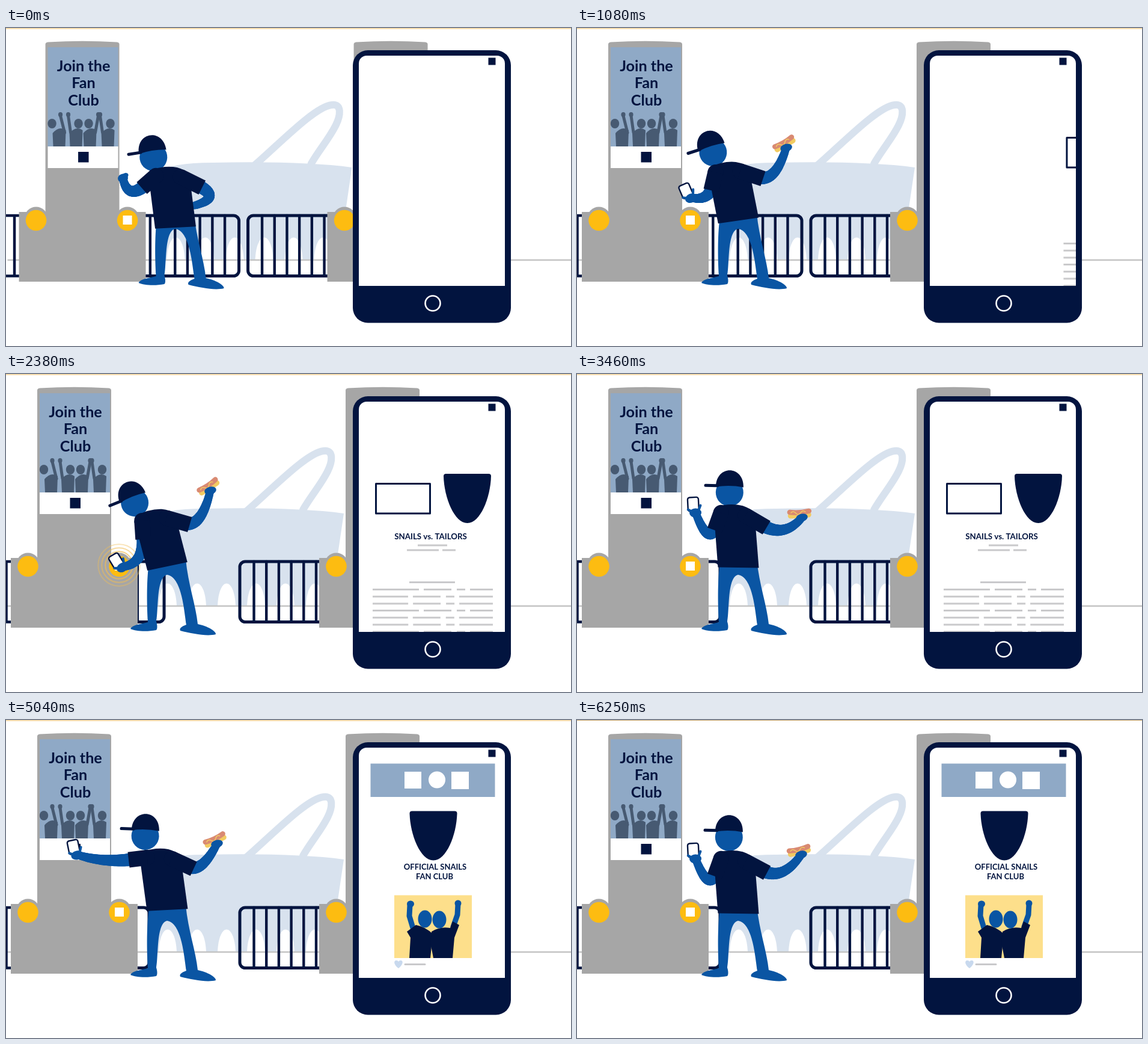
An HTML page with a canvas for the animation above (6290 ms loop, 940 by 529 pixels).

```html
<!DOCTYPE html>
<html lang="en">
<head>
<meta charset="utf-8">
<title>Fan club gate</title>
<style>
html, body { margin: 0; width: 100%; height: 100%; overflow: hidden; background: #fff; }
canvas { display: block; }
</style>
</head>
<body>
<canvas id="stage" width="940" height="529"></canvas>
<script>
const g = document.getElementById('stage').getContext('2d');
const LOOP = 6290;
const NAVY = '#02143f', SKIN = '#0a55a3', GRAY = '#a6a6a6', STEEL = '#8fa9c6',
  PALE = '#d8e2ee', GOLD = '#fdbc11', CROWD = '#475a72', RULE = '#c9c9cb';

const clamp = v => Math.min(1, Math.max(0, v));
const span = (t, a, b) => clamp((t - a) / (b - a));
const ease = p => p * p * (3 - 2 * p);
const mix = (a, b, p) => a + (b - a) * p;

function rect(x, y, w, h, color) { g.fillStyle = color; g.fillRect(x, y, w, h); }
function oval(x, y, rx, ry, color, turn = 0) {
  g.fillStyle = color;
  g.beginPath();
  g.ellipse(x, y, rx, ry, turn, 0, 7);
  g.fill();
}
function circle(x, y, r, color, width) {
  g.strokeStyle = color;
  g.lineWidth = width;
  g.beginPath();
  g.arc(x, y, r, 0, 7);
  g.stroke();
}
function shape(d, color) { g.fillStyle = color; g.fill(new Path2D(d)); }
function line(d, width, color) {
  g.strokeStyle = color;
  g.lineWidth = width;
  g.stroke(new Path2D(d));
}
function box(x, y, w, h, r, color, width) {
  g.beginPath();
  g.roundRect(x, y, w, h, r);
  if (width) { g.strokeStyle = color; g.lineWidth = width; g.stroke(); }
  else { g.fillStyle = color; g.fill(); }
}
function label(text, x, y, size) {
  g.font = `bold ${size}px Lato, sans-serif`;
  g.textAlign = 'center';
  g.fillStyle = NAVY;
  g.fillText(text, x, y);
}
function at(x, y, degrees, draw) {
  g.save();
  g.translate(x, y);
  g.rotate(degrees * Math.PI / 180);
  draw();
  g.restore();
}

// head: x, y, tilt; body: neck x, y, hip y, lean; arms: elbow x, y, hand x, y
const start = { head: [230, 204, -9], body: [251, 231, 332, -3], left: [189, 287, 181, 250], right: [346, 282, 301, 295] };
const wave = { head: [250, 185, -7], body: [257, 216, 321, 1], left: [189, 222, 180, 187], right: [342, 261, 368, 212] };
const tap = { head: [212, 201, -22], body: [239, 227, 320, -12], left: [231, 316, 193, 321], right: [325, 256, 340, 194] };
const tapLow = { ...tap, head: [210, 204, -22] };
const stand = { head: [254, 186, 1], body: [256, 217, 322, 1], left: [219, 288, 197, 230], right: [345, 273, 374, 239] };
const reach = { head: [232, 182, 2], body: [250, 214, 316, -3], left: [161, 238, 118, 224], right: [326, 254, 351, 206] };
const rest = { ...stand, head: [253, 184, 1], right: [342, 268, 373, 224] };
const keys = [[0, start], [630, wave], [1330, tap], [1580, tap], [2380, tapLow], [2550, tapLow],
  [3150, stand], [3950, stand], [4550, reach], [5200, reach], [5850, rest], [LOOP, rest]];

function poseAt(t) {
  const i = Math.max(1, keys.findIndex(k => k[0] > t));
  const [t0, a] = keys[i - 1], [t1, b] = keys[i], p = ease(span(t, t0, t1));
  const pose = {};
  for (const part in a) pose[part] = a[part].map((v, n) => mix(v, b[part][n], p));
  return pose;
}

function stadium() {
  line('M398 230C440 194 500 131 528 128C546 125 543 146 535 162C524 184 508 202 494 226', 12, PALE);
  shape('M238 240Q262 224 330 224Q480 221 562 232L552 300L547 386H250Z', PALE);
  for (let x = 269; x < 540; x += 49) shape(`M${x - 15} 386C${x - 13} 336 ${x + 13} 336 ${x + 15} 386Z`, '#fff');
  line('M-10 386H960', 2.5, '#c4c4c4');
}

function fence(x, dir) {
  box(dir > 0 ? x : x - 210, 312, 210, 100.5, 9, NAVY, 5);
  for (let i = 0; i < 9; i++) line(`M${x + dir * (23.5 + 20.7 * i)} 312V412`, 4.4, NAVY);
}

function pillar(x) {
  g.save();
  g.translate(x, 0);
  for (const cx of [36.5, 188.5]) oval(cx, 317, 19.5, 19.5, GRAY);
  shape('M52 310V27Q52 24 56 23.5Q114 20 171 23.5Q175 24 175 27V310Z', GRAY);
  rect(8, 306, 211, 116, GRAY);
  for (const cx of [36.5, 188.5]) oval(cx, 320, 17.3, 17.3, GOLD);
  g.restore();
}

function fan(head, body, hand) {
  oval(head, 159, 7.2, 8, CROWD);
  shape(`M${body - 11} 175Q${body} 162 ${body + 11} 170L${body + 10} 197H${body - 10}Z`, CROWD);
  line(`M${body + Math.sign(hand - body) * 9} 174L${hand} 146`, 5, CROWD);
  oval(hand, 144, 3.6, 4, CROWD);
}

function poster() {
  rect(56, 32, 117, 165, STEEL);
  rect(56, 197, 117, 36, '#fff');
  ['Join the', 'Fan', 'Club'].forEach((s, i) => label(s, 115.5, 72 + 28.4 * i, 25.2));
  fan(63, 75, 77);
  fan(107, 103, 90);
  fan(124, 126, 140);
  fan(160, 156, 143);
  rect(106.5, 206, 17.5, 17.5, NAVY);
  rect(181, 312, 15, 15, '#fff');
}

function rings(t) {
  const strength = Math.min(span(t, 2000, 2150), 1 - span(t, 2450, 2600));
  if (strength <= 0) return;
  g.save();
  for (let i = 0; i < 3; i++) {
    const p = (t / 500 + i / 3) % 1;
    g.globalAlpha = strength * (0.75 - 0.45 * p);
    circle(188, 318, 21 + 18 * p, '#f0bd55', 2);
  }
  g.restore();
}

// Point at (x, y) in the frame of the leaning neck or hips
function leaned(ox, oy, lean, x, y) {
  const a = lean * Math.PI / 180, c = Math.cos(a), s = Math.sin(a);
  return [ox + x * c - y * s, oy + x * s + y * c];
}

function arm([sx, sy], [ex, ey, hx, hy], sleeve) {
  const turn = Math.atan2(ey - sy, ex - sx);
  const x0 = sx + Math.cos(turn) * (sleeve - 8), y0 = sy + Math.sin(turn) * (sleeve - 8);
  for (let u = 0; u <= 1; u += 0.02) {
    const v = 1 - u, r = mix(11, 6.5, u);
    oval(v * v * x0 + 2 * u * v * ex + u * u * hx, v * v * y0 + 2 * u * v * ey + u * u * hy, r, r, SKIN);
  }
}

function sleeve([sx, sy], [ex, ey], length) {
  oval(sx, sy, 13, 13, NAVY);
  at(sx, sy, Math.atan2(ey - sy, ex - sx) * 180 / Math.PI, () => rect(0, -13, length, 26, NAVY));
}

function torso([nx, ny, hipY, lean]) {
  const top = (x, y) => leaned(nx, ny, lean, x, y);
  const hip = x => leaned(268.5, hipY, lean, x, 0);
  g.beginPath();
  g.moveTo(...top(-24, 4));
  g.quadraticCurveTo(...top(0, -3), ...top(20, 2));
  g.quadraticCurveTo(...top(34, 6), ...top(40, 18));
  g.lineTo(...hip(34));
  g.lineTo(...hip(-34));
  g.lineTo(...top(-28, 16));
  g.closePath();
  g.fillStyle = NAVY;
  g.fill();
}

function snack(x, y) {
  at(x - 4, y - 8, (y - 245) * 0.65, () => {
    line('M-15 4H15', 9, '#f2cb62');
    line('M-16 -2Q0 1 16 -2', 8.5, '#d98a72');
    line('M-14 -1Q-10 -5 -6 0T2 0T10 -1', 1.5, '#f2cb62');
  });
}

function leftHand(x, y, lean, holding) {
  at(x, y, 2.2 * lean - 5, () => {
    if (holding) {
      box(-12, -25, 18, 23, 3.5, '#fff');
      box(-12, -25, 18, 23, 3.5, NAVY, 2.4);
      oval(0, 1, 10, 7.5, SKIN);
      line('M-5 -1L-12 -5M5 -2L9 -11', 4, SKIN);
    } else {
      oval(0, 0, 8.5, 7.5, SKIN);
      oval(5, -4, 5, 4, SKIN);
    }
  });
}

function man(t) {
  const { head, body, left, right } = poseAt(t);
  const [nx, ny, , lean] = body;
  const leftShoulder = leaned(nx, ny, lean, -16, 14), rightShoulder = leaned(nx, ny, lean, 25, 18);
  shape('M238 313L299 308C303 350 316 385 319 416C335 419 350 428 349 433C335 437 310 432 290 427' +
    'C288 423 292 420 300 417C296 390 292 338 268 334C250 338 254 390 250 412C252 418 252 424 250 426' +
    'C235 429 215 428 207 424C210 417 225 416 236 413C234 380 234 340 238 313Z', SKIN);

  arm(rightShoulder, right, 40);
  if (t > 200) snack(right[2], right[3]);
  oval(right[2], right[3], 10, 6.5, SKIN, -0.25);
  arm(leftShoulder, left, 31);
  leftHand(left[2], left[3], lean, t > 980);

  at(...head, () => oval(0, 11, 23, 23, SKIN));
  torso(body);
  sleeve(rightShoulder, right, 40);
  sleeve(leftShoulder, left, 31);
  at(...head, () => {
    shape('M-23 2C-23 -35 23 -35 23 2Q0 -2 -23 2Z', NAVY);
    line('M-20 0L-40 0', 5, NAVY);
  });
}

function crest(x, y) {
  g.save();
  g.translate(x, y);
  shape('M4 0H75Q79 0 79 4C78 40 61 82 39.5 82C18 82 1 40 0 4Q0 0 4 0Z', NAVY);
  g.restore();
}

function ticket() {
  box(615.5, 182.5, 90, 49.5, 0, NAVY, 3);
  crest(728, 166);
  label('SNAILS vs. TAILORS', 706.5, 275, 13.3);
  g.save();
  g.lineCap = 'butt';
  line('M685 285H734M667 293H720M726 293H748M671 346.5H747', 3, RULE);
  for (let i = 0; i < 7; i++) {
    g.setLineDash([65 + 12 * Math.cos(2.1 * i), 8, 46, 9, 14, 8]);
    line(`M610 ${358.5 + 11.7 * i}H810`, 3, RULE);
  }
  g.restore();
}

function club() {
  rect(606.5, 72.5, 207, 55.5, STEEL);
  rect(663, 86, 28, 28, '#fff');
  oval(717, 99.5, 14, 14, '#fff');
  rect(741, 86, 29, 29, '#fff');
  crest(671.5, 151.5);
  label('OFFICIAL SNAILS', 714, 249, 13);
  label('FAN CLUB', 713, 265, 13);
  rect(646, 291.5, 129, 104.5, '#fddf8b');
  line('M677 346L671 326L672 308M744 344L751 324L752 306', 9, SKIN);
  oval(673, 306, 6, 5.5, SKIN);
  oval(752, 305, 5.5, 5.5, SKIN);
  shape('M667 352L682 341Q698 344 710 356L706 396H671L673 362Z', NAVY);
  shape('M708 352Q722 343 739 346L743 335L754 341L746 362L743 396H711L706 370Z', NAVY);
  oval(697, 331, 11.5, 14.5, SKIN);
  oval(721, 332, 11.5, 14.5, SKIN);
  shape('M653 413C643 405 646 399 650 400Q652 400 653 402Q654 400 656 400C661 399 662 406 653 413Z', '#c8d9ee');
  line('M664 406.5H697', 3, RULE);
}

function phone(t) {
  box(577, 37, 263, 453.5, 25, NAVY);
  box(587, 46, 243, 383, [13, 13, 0, 0], '#fff');
  g.save();
  g.beginPath();
  g.rect(587, 46, 243, 383);
  g.clip();
  const first = ease(span(t, 1000, 1300)), second = ease(span(t, 4650, 4950));
  g.translate(243 * (1 - first - second), 0);
  if (first > 0 && second < 1) ticket();
  g.translate(243, 0);
  if (second > 0) club();
  g.restore();
  rect(802.5, 49.5, 12, 12, NAVY);
  circle(710, 458, 12.5, '#fff', 2.6);
}

function draw(t) {
  g.lineCap = g.lineJoin = 'round';
  rect(0, 0, 940, 529, '#fff');
  g.save();
  g.translate(13.6 * (1 - span(t, 0, 560)) ** 2, 0);
  stadium();
  fence(389, 1);
  fence(374 - 136 * ease(span(t, 1960, 2540)), -1);
  line('M-30 312H12M-30 412.5H12M0.5 312V412', 4.5, NAVY);
  pillar(0);
  pillar(513);
  poster();
  rings(t);
  man(t);
  g.restore();
  phone(t);
  if (t < 5900) rect(0, 0, 940, 2, '#f8dfb0');
  else rect(0, 0, 940, 1, '#c9a467');
}

const begin = performance.now();
function tick() {
  draw((performance.now() - begin) % LOOP);
  requestAnimationFrame(tick);
}
tick();
</script>
</body>
</html>
```
